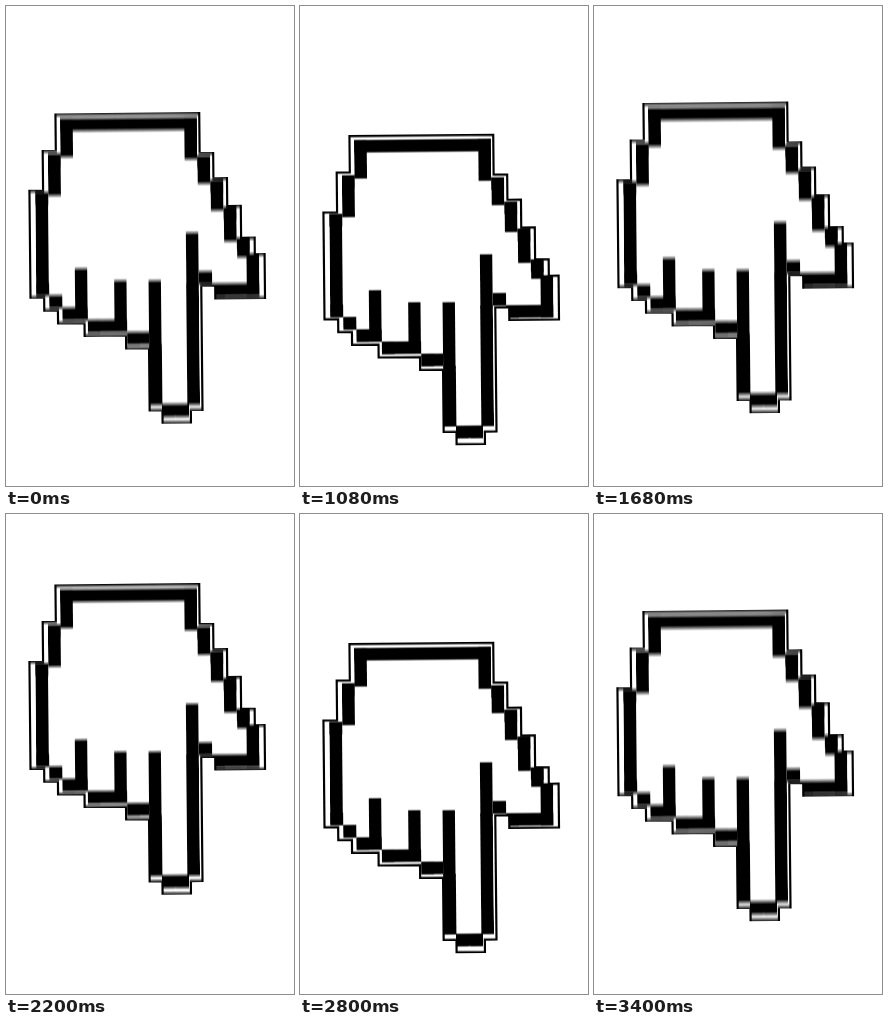
An HTML page with a canvas for the animation above (3.44 s loop, 288 px wide and 480 px high).

```html
<!DOCTYPE html>
<html lang="en">
<head>
<meta charset="utf-8">
<title>Pointing hand</title>
<style>
  html, body { margin: 0; width: 100%; height: 100%; overflow: hidden; background: #fff; }
  canvas { display: block; }
</style>
</head>
<body>
<canvas id="stage" width="288" height="480"></canvas>
<script>
const W = 288, H = 480;
const view = document.getElementById('stage').getContext('2d');
const layer = document.createElement('canvas');
layer.width = W;
layer.height = H;
const pen = layer.getContext('2d');

const STEP = 40, LOOP = 3440, PERIOD = LOOP / 4;
const SWING = 37, PHASE = 0.35, REST = -34;
const SAMPLES = 15, SHUTTER = STEP / 2;
const TILT = 0.01, WALL = 12.7, OVERLAP = 3.5, RIM = 2.2;

// Clockwise outline; every move goes across, then up or down
const corners = [[55.5, 132.8]];
function walk(x, y) {
  const [, lastY] = corners[corners.length - 1];
  corners.push([x, lastY], [x, y]);
}
[171.5, 196, 223, 254, 270].forEach((y, i) => walk(192.4 + 12.9 * i, y));
walk(253.3, 312.3);
walk(206, 300);
walk(192.7, 420.3);
walk(181.6, 432.3);
walk(154.6, 420.3);
[142.4, 120.6, 81.2, 56, 43].forEach((x, i) => walk(x, 360 - 12.5 * i));
walk(30, 206.5);
walk(43, 168);
walk(55.5, 132.8);

function polygon(points) {
  const path = new Path2D();
  points.forEach(([x, y]) => path.lineTo(x, y));
  path.closePath();
  return path;
}
const outline = polygon(corners);
const rim = polygon(corners.map(([x, y]) => [145 + (x - 145) * 1.05, 251 + (y - 251) * 1.032]));

// A thick wall on the inner side of each edge
const walls = [];
for (let i = 1; i < corners.length; i++) {
  const [ax, ay] = corners[i - 1], [bx, by] = corners[i];
  if (ay === by) {
    walls.push([Math.min(ax, bx), bx > ax ? ay : ay - WALL, Math.abs(bx - ax), WALL]);
  } else {
    walls.push([by > ay ? ax - WALL : ax, Math.min(ay, by), WALL, Math.abs(by - ay) + OVERLAP]);
  }
}
// Creases between the fingers: left, top, bottom
for (const [x, top, bottom] of [[68.8, 283.3, 335], [108, 295.7, 347], [142.4, 296, 362], [180.2, 248.5, 302]]) {
  walls.push([x, top, 12.4, bottom - top]);
}

function place(ctx, dy) {
  ctx.setTransform(1, -TILT, TILT, 1, -285 * TILT, 143 * TILT + dy);
  ctx.lineWidth = RIM;
}

// The white parts of the hand, on a clear layer
function paintWhite(dy) {
  pen.save();
  pen.clearRect(0, 0, W, H);
  place(pen, dy);
  pen.fillStyle = '#fff';
  pen.fill(rim);
  pen.globalCompositeOperation = 'destination-out';
  pen.stroke(rim);
  pen.clip(outline);
  for (const wall of walls) pen.fillRect(...wall);
  pen.restore();
}

function offset(ms) {
  return REST + SWING * Math.sin(ms / PERIOD * 2 * Math.PI + PHASE);
}

// Hard black silhouette, with the white parts blurred over the open shutter
function render(ms) {
  view.fillStyle = '#fff';
  view.fillRect(0, 0, W, H);
  view.save();
  place(view, offset(ms));
  view.fillStyle = view.strokeStyle = '#000';
  view.fill(rim);
  view.stroke(rim);
  view.restore();

  view.save();
  view.globalCompositeOperation = 'lighter';
  view.globalAlpha = 1 / SAMPLES;
  for (let i = 0; i < SAMPLES; i++) {
    paintWhite(offset(ms + ((i + 0.5) / SAMPLES - 0.5) * SHUTTER));
    view.drawImage(layer, 0, 0);
  }
  view.restore();
}

let start = null, shown = 0;
function tick(now) {
  if (start === null) start = now;
  const step = Math.floor((now - start) % LOOP / STEP);
  if (step !== shown) render((shown = step) * STEP);
  requestAnimationFrame(tick);
}
render(0);
requestAnimationFrame(tick);
</script>
</body>
</html>
```
